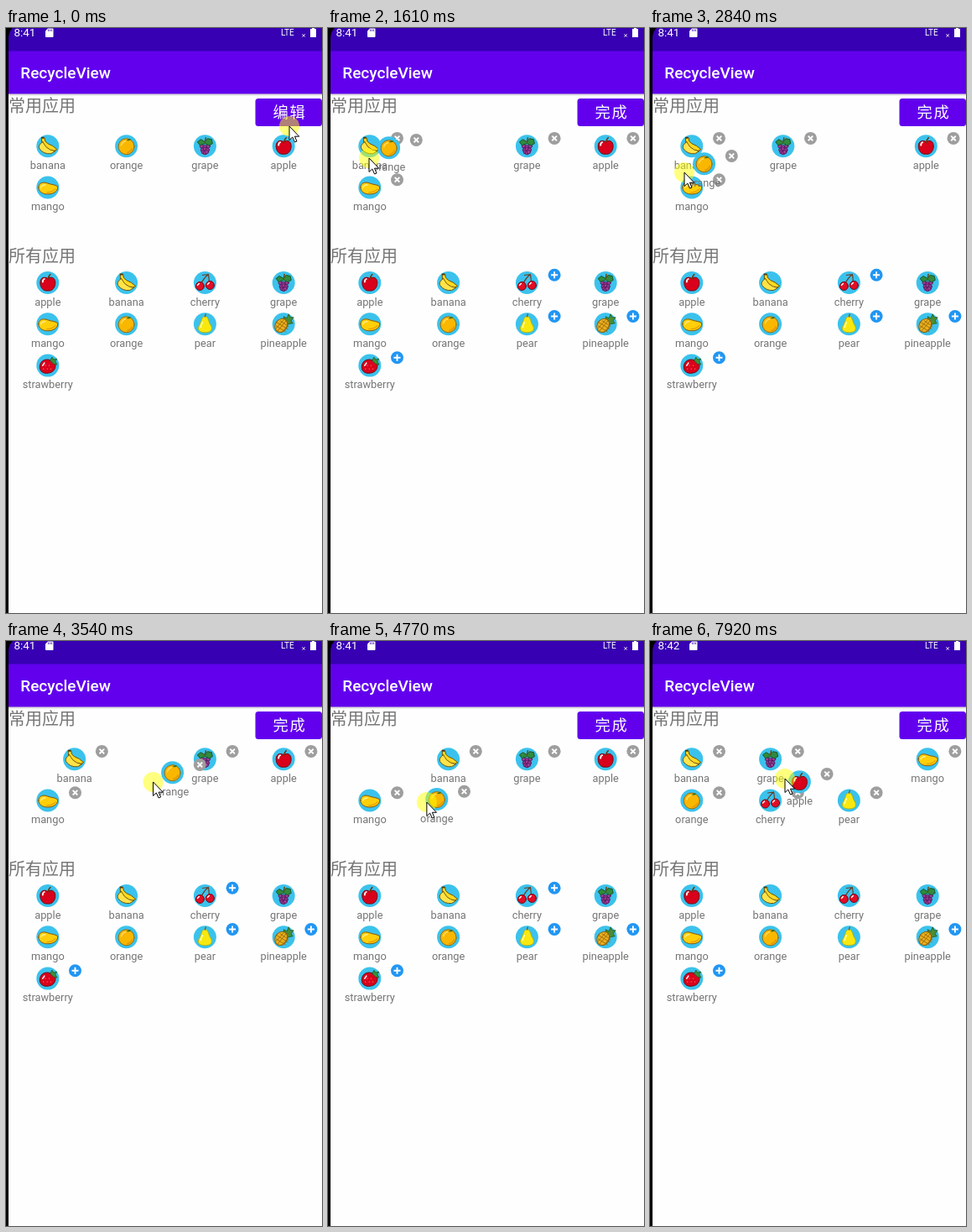
Animation of 377 by 697 pixels, one loop 8000 ms. Source, as an HTML page:

```html
<!DOCTYPE html>
<html lang="zh-CN">
<head>
<meta charset="utf-8">
<title>RecycleView</title>
<style>
  html, body { margin: 0; width: 100%; height: 100%; overflow: hidden; background: #000; }
  svg { display: block; }
  text { font-family: Roboto, sans-serif; }
  .cjk { font-family: "Noto Sans CJK SC", "Noto Sans CJK", sans-serif; }
  .label { font-size: 12.8px; fill: #757575; text-anchor: middle; }
</style>
</head>
<body>
<svg id="stage" width="377" height="697" viewBox="0 0 377 697">
  <defs>
    <linearGradient id="shade" x2="0" y2="1">
      <stop stop-opacity=".2"/><stop offset="1" stop-opacity="0"/>
    </linearGradient>
  </defs>
  <rect width="377" height="697"/>
  <rect x="3" y="78" width="374" height="619" fill="#fefefe"/>
  <path d="M3 28V13Q3 4 8 0H377V28Z" fill="#3700b3"/>
  <rect x="3" y="27.5" width="374" height="51" fill="#6200ee"/>
  <rect x="3" y="78.5" width="374" height="3" fill="url(#shade)"/>
  <g fill="#fff">
    <text id="clock" x="9.5" y="10.3" font-size="13.4">8:41</text>
    <path d="M50 .5H55.5Q56.5 .5 56.5 1.5V10Q56.5 11 55.5 11H48Q47 11 47 10V3.5Z"/>
    <path d="M50.5 1.5V4M52.5 1.5V4M54.5 1.5V4" stroke="#3700b3" stroke-width=".8"/>
    <text x="328" y="9.3" font-size="10">LTE</text>
    <path d="M353.5 7.3L356.7 10.5M356.7 7.3L353.5 10.5" stroke="#fff"/>
    <path d="M363 1H365V0H368V1H370V11H363Z"/>
    <text x="17.3" y="60.3" font-size="19" font-weight="500">RecycleView</text>
  </g>
  <g font-size="20" fill="#757575">
    <text class="cjk" x="3" y="99.7">常用应用</text>
    <text class="cjk" x="3" y="279.2">所有应用</text>
  </g>
  <rect x="297.5" y="84" width="79.5" height="33" rx="3.5" fill="#6200ee"/>
  <text id="button" class="cjk" x="318.5" y="107" font-size="18.3" letter-spacing="1.7" fill="#fff">编辑</text>
  <g id="items"></g>
  <circle id="press" r="12" fill="#ff0" opacity=".5"/>
  <path id="cursor" d="M0 0V16.5L3.8 13L6.5 19L9 18L6.5 12.2H11.7Z" fill="#fff" stroke="#000"/>
</svg>
<script>
const $ = id => document.getElementById(id);
const dots = (n, r, spot) => Array.from({ length: n }, (_, i) => {
  const [x, y] = spot(i);
  return `<circle cx="${x}" cy="${y}" r="${r}"/>`;
}).join('');

// Each fruit is drawn around the middle of its disc.
const fruit = {
  apple: `<path d="M0-5C-4-8-9-6-9 0C-9 6-5 10-1 9.5H1C5 10 9 6 9 0C9-6 4-8 0-5Z" fill="#d9001b" stroke="#6b0714"/>
    <path d="M0-4Q1-8 3-10" stroke="#6b3410" stroke-width="1.6"/>
    <path d="M-6-1Q-6-4-4-4.5" stroke="#fff" stroke-width="1.8"/>`,
  banana: `<path d="M-7-10L-4-10Q-4-5 0-3Q6-1 11 4Q8 7 3 5Q-5 4-7-3Z" fill="#ffd91f" stroke="#70540c"/>
    <path d="M-6-5Q-12-1-10 3Q-5 10 4 9L9 6Q2 5-2 1Q-4-2-6-5Z" fill="#ffe34a" stroke="#70540c"/>
    <path d="M-7-10H-5" stroke="#503a08" stroke-width="2"/>`,
  cherry: `<path d="M-5 2Q-2-5 4-10Q5-4 5 0M-3-9L4-10" stroke="#6b3c22" stroke-width="1.2"/>
    <g fill="#e10d25" stroke="#6d0717"><circle cx="-6" cy="4" r="5"/><circle cx="6" cy="3" r="5"/></g>
    <path d="M-9 3L-7 1M3 2L5 0" stroke="#fff" stroke-width="1.4"/>`,
  grape: `<g fill="#a03c98" stroke="#4a1552" stroke-width=".8">
    ${dots(9, 2.2, i => [(i % 3 - 1) * (4 - Math.floor(i / 3)), Math.floor(i / 3) * 3.5 + i % 2])}</g>
    <path d="M0-3L-6-1L-9-5L-5-8L0-5L3-9L8-8L9-3L5-1Z" fill="#2f8b3c" stroke="#17552a"/>
    <path d="M0-5L1-10" stroke="#6b4a17" stroke-width="1.5"/>`,
  mango: `<path d="M-11 0C-11-6-5-7 0-5C5-3 8-4 12-1C12 5 6 8 0 8C-6 8-11 5-11 0Z" fill="#ffcf0a" stroke="#85560a"/>
    <path d="M-8 0Q-7-3-3-3" stroke="#ffed8a" stroke-width="1.4"/><path d="M9 2Q5 6-1 6" stroke="#e9a400" stroke-width="1.4"/>`,
  orange: `<circle cy=".5" r="9.5" fill="#f9b700" stroke="#9a6a08"/>
    <path d="M-6-1Q-5-5-1-6" stroke="#ffdc63" stroke-width="1.5"/><path d="M7 3Q5 7 1 8" stroke="#e39a00" stroke-width="1.5"/>
    <path d="M1-7Q3-9 5-8Q4-6 1-7Z" fill="#3f7a2c" stroke="#2f6a1d" stroke-width=".6"/>`,
  pear: `<path d="M0-9C4-9 4-4 6 0C11 7 6 10 0 10S-11 7-6 0C-4-4-4-9 0-9Z" fill="#f8e80e" stroke="#b5ad00" stroke-width=".8"/>
    <path d="M0-9L1-12" stroke="#67602a" stroke-width="1.3"/><path d="M-5 4Q-5 1-3-2" stroke="#fffbb8" stroke-width="1.6"/>`,
  pineapple: `<path d="M1-4L0-9L4-7L6-12L8-8L12-8L9-4L11-1L5 0Z" fill="#4b8d35" stroke="#1d5b27" stroke-width=".8"/>
    <ellipse cx="-1.5" cy="3" rx="7" ry="8.5" transform="rotate(35)" fill="#e9b01c" stroke="#85570c"/>
    <path d="M-9 2L2 9M-8-2L5 6M-4-4L6 3M-7 8L3-4M-9 5L0-5M-2 10L6 0" stroke="#94620c" stroke-width=".8"/>`,
  strawberry: `<path d="M4-6C-2-9-9-6-9.500 1C-10 8-4 10 1 9C7 8 10 4 9-2Z" fill="#da001c" stroke="#6a0715"/>
    <path d="M3-6L5-10L7-7L11-8L9-5L11-1L7-2Z" fill="#38923a" stroke="#1d5b27" stroke-width=".8"/>
    <path d="M-6 0L-4-3" stroke="#fff" stroke-width="1.6"/>
    <g fill="#ff9a6a">${dots(5, .6, i => [i * 2.2 - 5, 4 - i % 2 * 4])}</g>`
};

function makeItem(name, color, turn) {
  const g = document.createElementNS('http://www.w3.org/2000/svg', 'g');
  g.innerHTML = `<circle r="13.5" fill="#3bc2ec"/>
    <g fill="none" stroke-linecap="round" stroke-linejoin="round">${fruit[name]}</g>
    <text class="label" y="27">${name}</text>
    <g class="badge" transform="translate(32.7 -9.3)"><circle r="7.5" fill="${color}"/>
    <path d="M-4 0H4M0-4V4" stroke="#fff" stroke-width="1.9" transform="rotate(${turn})"/></g>`;
  $('items').append(g);
  return { name, g, badge: g.querySelector('.badge') };
}

const slot = (i, top = 140.7) => [49.8 + i % 4 * 93.8, top + Math.floor(i / 4) * 49.3];
const move = (g, [x, y]) => g.setAttribute('transform', `translate(${x} ${y})`);
const show = (el, on) => el.style.display = on ? '' : 'none';
const mix = (a, b, k) => a.map((v, i) => v + (b[i] - v) * k);
const clamp = (v, lo, hi) => Math.min(hi, Math.max(lo, v));
const settle = (a, b, ms) => mix(a, b, (1 - Math.cos(Math.PI * clamp(ms / 250, 0, 1))) / 2);

const catalog = Object.keys(fruit).map((name, i) => {
  const item = makeItem(name, '#2196f3', 0);
  move(item.g, slot(i, 303.5));
  return item;
});
// Dragged fruits come last so that they lie on top.
const favorites = ['grape', 'mango', 'banana', 'cherry', 'pear', 'apple', 'orange']
  .map(name => makeItem(name, '#9e9e9e', 45));

// Time, x, y of the pointer; it moves straight between these points.
const path = [
  [80, 338, 117], [800, 120, 152], [1200, 120, 152],
  [1550, 49, 154], [1612, 49, 155], [1690, 14, 195], [2250, 312, 118],
  [2713, 120, 166], [2780, 41, 173], [2843, 41, 172], [2900, 22, 172],
  [3330, 120, 160], [3480, 175, 168], [3540, 175, 168], [3780, 312, 155], [4050, 22, 165],
  [4540, 106, 200], [4710, 106, 200], [4770, 118, 192], [5080, 70, 212],
  [5500, 277, 292], [5700, 277, 292], [6000, 277, 346], [6540, 277, 346],
  [6900, 204, 190], [7080, 204, 190], [7200, 220, 137], [7700, 220, 137], [7850, 161, 164]
];
const presses = [[0, 75], [840, 5080], [5490, 5690], [6070, 6250], [7220, 8000]];

function pointer(t) {
  const i = path.findIndex(p => p[0] > t);
  if (i < 1) return path.at(i).slice(1);
  const a = path[i - 1], b = path[i];
  return mix(a, b, (t - a[0]) / (b[0] - a[0])).slice(1);
}

const drags = {
  orange: { start: 1200, end: 5080, from: slot(1) },
  apple: { start: 7700, end: 8000, from: slot(2) }
};

// A held fruit trails the pointer slightly.
function held({ start, from }, t) {
  const grip = pointer(start), now = pointer(Math.max(start, t - 60));
  return from.map((v, i) => v + now[i] - grip[i]);
}

// The orange trades places whenever it passes the middle of another slot.
const rest = ['banana', 'grape', 'apple', 'mango'];
const orders = [];
const insert = (time, i) => orders.push([time, rest.toSpliced(i, 0, 'orange')]);
let index = 1;
insert(0, index);
for (let t = drags.orange.start; t < drags.orange.end; t += 5) {
  const [x, y] = held(drags.orange, t), column = (x - slot(0)[0]) / 93.8;
  const next = y > slot(4)[1] ? 4 : clamp(clamp(index, Math.floor(column), Math.ceil(column)), 0, 3);
  if (next !== index) insert(t, index = next);
}
for (const [time, name] of [[5600, 'cherry'], [6250, 'pear']]) orders.push([time, [...orders.at(-1)[1], name]]);

function place(name, t, k) {
  const [start, order] = orders[k], goal = slot(order.indexOf(name));
  if (!k || !orders[k - 1][1].includes(name)) return goal;
  return settle(place(name, start, k - 1), goal, t - start);
}

function position(name, t, k) {
  const drag = drags[name];
  if (!drag || t < drag.start) return place(name, t, k);
  if (t < drag.end) return held(drag, t);
  return settle(held(drag, drag.end), place(name, t, k), t - drag.end);
}

function draw(t) {
  const editing = t > 75;
  const k = orders.findLastIndex(o => o[0] <= t), order = orders[k][1];
  $('clock').textContent = t < 7500 ? '8:41' : '8:42';
  $('button').textContent = editing ? '完成' : '编辑';
  for (const { name, g, badge } of favorites) {
    show(g, order.includes(name));
    show(badge, editing);
    if (order.includes(name)) move(g, position(name, t, k));
  }
  for (const { name, badge } of catalog) show(badge, editing && !order.includes(name));
  const tip = pointer(t);
  move($('press'), tip);
  move($('cursor'), tip);
  show($('press'), presses.some(([a, b]) => t >= a && t < b));
}

const began = performance.now();
function tick() {
  draw((performance.now() - began) % 8000);
  requestAnimationFrame(tick);
}
tick();
</script>
</body>
</html>
```
